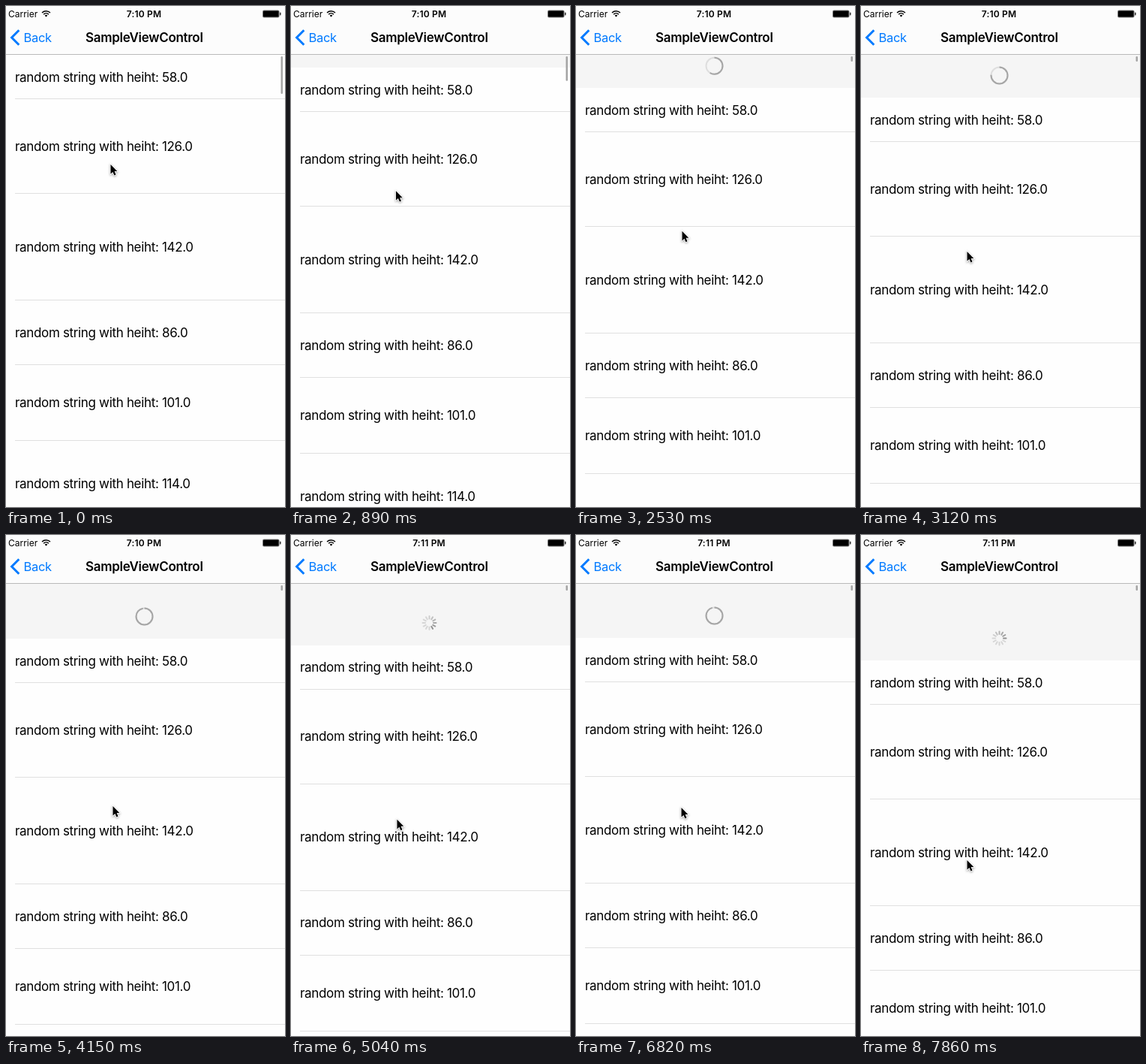
Animation, 372 px wide and 667 px high, one loop 8000 ms. Source, as an HTML page with a canvas:

```html
<!DOCTYPE html>
<html lang="en">
<head>
<meta charset="utf-8">
<title>Pull to refresh</title>
<style>
  html, body { margin: 0; width: 100%; height: 100%; overflow: hidden; background: #fefefe; }
  canvas { display: block; }
</style>
</head>
<body>
<canvas id="stage" width="372" height="667"></canvas>
<script>
const ctx = document.getElementById('stage').getContext('2d');
const W = 372, H = 667, NAV = 65;
const LOOP = 8000, STEP = 148, LAST_STEP = 53;
const THRESHOLD = 75;
const CLOCK_STEP = 33;
const FONT = 'Inter, Roboto, sans-serif';
const ROWS = [58, 126, 142, 86, 101, 114];

// step, pull distance, pointer x, pointer y
const DRAG = [
  [0, 0, 139.5, 211], [7, 20, 140, 252], [8, 20, 140, 252],
  [13, 39, 141.5, 289], [15, 41, 141.5, 293], [16, 41, 141.5, 293],
  [21, 57, 141.5, 327], [24, 64, 142, 342], [28, 73, 142.5, 361],
  [29, 73, 142.5, 361], [36, 85, 141, 386], [37, 84, 140.5, 383],
  [39, 80, 140.5, 375.5], [45, 68, 140.5, 355], [46, 72, 140.5, 363],
  [53, 102, 141.5, 433]
];

function poseAt(step) {
  const i = Math.max(1, DRAG.findIndex(key => key[0] >= step));
  const a = DRAG[i - 1], b = DRAG[i];
  const k = (step - a[0]) / (b[0] - a[0]);
  const [, pull, x, y] = a.map((v, n) => v + (b[n] - v) * k);
  return { pull, x, y };
}

function rect(x, y, w, h, color, radius = 0) {
  ctx.fillStyle = color;
  ctx.beginPath();
  ctx.roundRect(x, y, w, h, radius);
  ctx.fill();
}

function text(str, x, y, { size = 17, weight = 400, color = '#000', align = 'left', spacing = -0.33 } = {}) {
  ctx.font = `${weight} ${size}px ${FONT}`;
  ctx.letterSpacing = spacing + 'px';
  ctx.textAlign = align;
  ctx.fillStyle = color;
  ctx.fillText(str, x, y);
}

function stroke(color, width, path) {
  ctx.strokeStyle = color;
  ctx.lineWidth = width;
  ctx.beginPath();
  path();
  ctx.stroke();
}

function drawRows(pull) {
  let top = NAV + pull;
  for (const height of ROWS) {
    text(`random string with heiht: ${height}.0`, 12, Math.round(top + height / 2 + 6.5));
    top += height;
    rect(12, Math.round(top), W - 12, 1, '#e0e0e0');
  }
}

function drawRing(y, progress) {
  const top = -Math.PI / 2;
  stroke('#dedede', 2, () => ctx.arc(184.5, y, 11, 0, Math.PI * 2));
  stroke('#a6a6a6', 2, () => ctx.arc(184.5, y, 11, top, top + Math.PI * 2 * progress));
}

function drawSpinner(y, step) {
  const head = Math.floor((step - LAST_STEP) * STEP * 12 / 1000) + 3;
  ctx.save();
  ctx.translate(184.5, y);
  ctx.lineCap = 'round';
  for (let i = 0; i < 12; i++) {
    const age = (((head - i) % 12) + 12) % 12;
    const angle = i * Math.PI / 6;
    const shade = Math.min(214, 145 + age * 12);
    stroke(`rgb(${shade},${shade},${shade})`, 2, () => {
      ctx.moveTo(Math.sin(angle) * 5.5, -Math.cos(angle) * 5.5);
      ctx.lineTo(Math.sin(angle) * 9, -Math.cos(angle) * 9);
    });
  }
  ctx.restore();
}

function drawHeader(pull, step) {
  if (pull <= 0) return;
  rect(0, NAV, W, Math.round(pull), '#f5f5f5');
  const y = NAV + pull - 29.5;
  if (pull < THRESHOLD) drawRing(y, pull / THRESHOLD);
  else drawSpinner(y, step);
}

function drawBars(step) {
  rect(0, 0, W, NAV - 1, '#fcfcfc');
  rect(0, NAV - 1, W, 1, '#bababa');

  text('Carrier', 3, 14.5, { size: 12, spacing: 0 });
  for (const r of [4.7, 7.7]) {
    stroke('#000', 1.6, () => ctx.arc(53.5, 14.5, r, -Math.PI * 0.75, -Math.PI * 0.25));
  }
  ctx.fillStyle = '#000';
  ctx.beginPath();
  ctx.moveTo(53.5, 14.5);
  ctx.arc(53.5, 14.5, 2.6, -Math.PI * 0.75, -Math.PI * 0.25);
  ctx.fill();
  text(step < CLOCK_STEP ? '7:10 PM' : '7:11 PM', 184, 14.5,
    { size: 12, weight: 600, align: 'center', spacing: 0.2 });
  rect(342, 5.5, 22.5, 10, '#777', 2);
  rect(343, 6.5, 20.5, 8, '#000', 1);
  rect(365, 8.5, 1.5, 4, '#333', 0.7);

  stroke('#007aff', 3, () => {
    ctx.moveTo(17.3, 32.3);
    ctx.lineTo(7.6, 42);
    ctx.lineTo(17.3, 51.7);
  });
  text('Back', 23.5, 48, { color: '#007aff', size: 16.5 });
  text('SampleViewControl', 184.3, 48, { weight: 600, align: 'center', spacing: -0.3 });
}

const ARROW = new Path2D('M0 0V12.6L2.9 9.9 4.9 14.4 7 13.5 5.1 9H8.8Z');

function drawPointer(x, y) {
  ctx.save();
  ctx.translate(x, y);
  ctx.lineWidth = 1.6;
  ctx.strokeStyle = '#fff';
  ctx.shadowColor = 'rgba(0,0,0,.4)';
  ctx.shadowBlur = 3;
  ctx.shadowOffsetY = 1;
  ctx.stroke(ARROW);
  ctx.shadowColor = 'transparent';
  ctx.fillStyle = '#000';
  ctx.fill(ARROW);
  ctx.restore();
}

function draw(now) {
  const step = Math.min(LAST_STEP, Math.floor((now % LOOP) / STEP));
  const { pull, x, y } = poseAt(step);
  rect(0, 0, W, H, '#fefefe');
  drawHeader(pull, step);
  drawRows(pull);
  rect(366.5, 67, 2.5, Math.max(7, 50 - pull), '#a4a4a4', 1.25);
  drawBars(step);
  drawPointer(x, y);
}

const start = performance.now();
function frame() {
  draw(performance.now() - start);
  requestAnimationFrame(frame);
}
frame();
</script>
</body>
</html>
```
